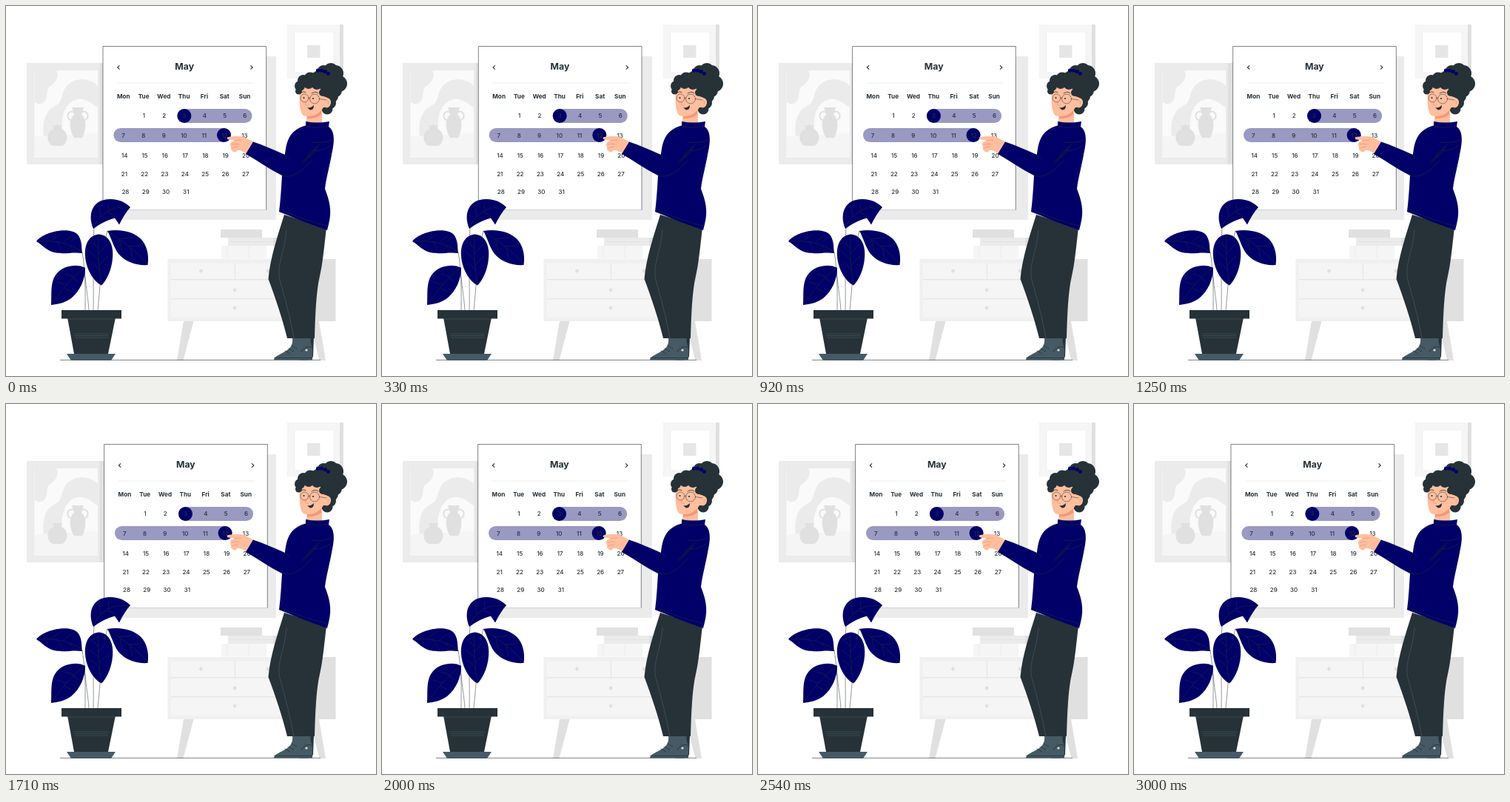
Write an HTML page that moves like this. It is 500x500 px and loops after 3.04 s.

```html
<!DOCTYPE html>
<html lang="en">
<head>
<meta charset="utf-8">
<title>Calendar</title>
<style>
  html, body { margin: 0; width: 100%; height: 100%; overflow: hidden; background: #fff; }
  svg { display: block; width: 100vw; height: 100vh; }
  text { font-family: Inter, "Open Sans", sans-serif; font-size: 8px; font-weight: 500; fill: #263238; text-anchor: middle; }
  .head { font-size: 8.2px; font-weight: 700; }
  .title { font-size: 12.3px; font-weight: 700; }
  .navy { fill: #000068; }
  .dark { fill: #263238; }
  .slate { fill: #455a64; }
  .skin { fill: #ffbe9d; }
  .line { fill: none; stroke: #263238; stroke-width: .8; stroke-linecap: round; stroke-linejoin: round; }
  .thin { stroke-width: .5; }
  .blush { fill: none; stroke: #e58a6b; stroke-width: .6; }
  .g1 { fill: #fafafa; }
  .g2 { fill: #f5f5f5; }
  .g3 { fill: #ebebeb; }
  .g4 { fill: #e0e0e0; }

  /* 3 s shake, then a 40 ms rest before the loop restarts */
  #calendar { animation: shake 3040ms linear infinite; }
  @keyframes shake {
    0%, 98.684%, 100% { transform: translateX(0); }
    9.868%, 88.816% { transform: translateX(-1px); }
    19.737%, 78.947% { transform: translateX(2px); }
    29.605%, 49.342%, 69.079% { transform: translateX(-4px); }
    39.474%, 59.211% { transform: translateX(4px); }
  }
</style>
</head>
<body>
<svg viewBox="0 0 500 500">
  <!-- Large picture -->
  <g>
    <path class="g4" d="M28.5 77H136V214H28.5Z"/>
    <path class="g3" d="M28.5 77H126.5V214H28.5Z"/>
    <path class="g1" d="M38.5 87H124V205H38.5Z"/>
    <path class="g3" d="M39 87H68C73 96 66 104 59 109C53 113 58 125 51 130C46 134 41 132 39 129Z"/>
    <path class="g3" d="M51 176C49 155 53 141 68 134C78 129 74 113 85 105C97 96 113 97 124 108V176Z"/>
    <path class="g1" d="M76 175C73 151 79 133 93 127C106 122 116 132 124 137V175Z"/>
    <path class="g2" d="M38.5 176L124 172V205H38.5Z"/>
    <path class="g4" d="M63 161H76L74.5 166C85 170 85 184 76 189H63C54 184 54 170 64.5 166Z"/>
    <path class="g4" d="M89 137H105L102 147C110 153 108 169 103 178H92C86 169 84 153 92 147Z"/>
    <path d="M91 143C81 141 82 152 88 155M103 143C113 141 112 152 106 155" fill="none" stroke="#e0e0e0" stroke-width="2"/>
  </g>

  <!-- Small picture -->
  <path class="g4" d="M380.5 25H456V98H380.5Z"/>
  <path d="M380.5 25H451V98H380.5Z" fill="#f6f6f6"/>
  <path d="M390 35H443V90H390Z" fill="#fff" stroke="#ebebeb" stroke-width=".6"/>
  <path d="M407 53H424.5V70H407Z" fill="#e6e6e6"/>

  <!-- Cabinet and books -->
  <path class="g4" d="M240 426H253.5L239.5 479H231ZM410 426H423L432 479H423.5Z"/>
  <path class="g4" d="M399 342H445.5V426H399Z"/>
  <path d="M218.5 342H400V426H218.5Z" fill="#f0f0f0"/>
  <path class="g2" d="M223 347.5H309V369H223ZM310 347.5H395V369H310ZM223 370.5H395V395H223ZM223 396.5H395V421H223Z"/>
  <path d="M223 369.7H395M223 395.7H395M309.5 347V369" fill="none" stroke="#e0e0e0" stroke-width=".7"/>
  <g class="g4">
    <circle cx="263.5" cy="358" r="2.4"/><circle cx="354" cy="358" r="2.4"/>
    <circle cx="309" cy="384" r="2.4"/><circle cx="309" cy="408" r="2.4"/>
  </g>
  <path class="g4" d="M290 302H346V313H290Z"/>
  <path class="g3" d="M300 313H367V324H300Z"/>
  <path class="g4" d="M361 313H367V324H361Z"/>
  <path d="M303 318.5H361" stroke="#e0e0e0" stroke-width=".8"/>
  <path class="g2" d="M291 324H352V341.5H291Z"/>
  <path d="M299 324V341M328 324V341" stroke="#ebebeb"/>

  <!-- Wall shadow -->
  <path class="g3" d="M144 68H365V289H144Z"/>

  <g id="calendar">
    <path d="M131 54.5H351.7V275.5H131Z" fill="#fff"/>
    <path d="M131 275.5H351.7" stroke="#b8bcbe" stroke-width=".6"/>
    <path d="M131 275.5V54.5H351.7V275.5" fill="none" stroke="#263238" stroke-width=".6"/>
    <path d="M150.5 104H334.5" stroke="#e4e4e4" stroke-width=".7"/>
    <path d="M153.5 80.3L150.7 83L153.5 85.7M330.5 80.3L333.3 83L330.5 85.7" fill="none" stroke="#263238" stroke-width="1.1"/>
    <text class="title" x="241.2" y="86.3">May</text>
    <rect x="231.5" y="139" width="101" height="19" rx="9.5" fill="#9999c2"/>
    <rect x="145.4" y="165" width="158.5" height="19" rx="9.5" fill="#9999c2"/>
    <circle class="navy" cx="240.9" cy="148.5" r="9.5"/>
    <circle class="navy" cx="294.5" cy="174.5" r="9.5"/>
    <g id="days"></g>
  </g>

  <path d="M73 478.4H425" stroke="#263238" stroke-width=".6"/>

  <!-- Plant -->
  <g>
    <path class="line thin" d="M106 353C107 375 111 394 112 411M103 333C108 362 107 385 107 411M119 300C116 340 119 375 118 411M137 304C130 330 129 360 124 411"/>
    <g class="navy">
      <path d="M118 301C110 282 116 261 141 261C154 261 162 266 168 272Q160 281 153 295.5L147 286.5Q131 291 118 301Z"/>
      <path d="M41 318C51 304 92 296 99 312C103 320 102 328 103 334C89 332 79 336 65 333C54 330 48 322 41 318Z"/>
      <path d="M137 304C155 301 175 305 185 318C192 328 193 340 191.5 350C177 351 163 346 155 338C146 330 143 314 137 304Z"/>
      <path d="M125 308.5C140 309 146 325 144 341C143 356 136 371 129 377.5C118 372 108 355 107 338C106 322 112 310 125 308.5Z"/>
      <path d="M107 354C107 370 100 385 88 395C80 401 70 403 61 404C62 390 59 372 69 361C78 350 98 348 107 354Z"/>
    </g>
    <path class="line thin" d="M118 299C128 279 145 270 165 272M128 284L126 272M139 277L138 267M137 279L147 283
      M45 318C66 316 89 321 102 332M62 317L72 309M78 319L88 311M69 318L75 328M86 323L91 329
      M138 305C157 318 177 331 191 349M152 315L170 313M166 325L182 324M154 317L157 331M168 327L171 340
      M125 310C124 336 126 359 129 376M125 327L115 319M125 342L113 332M127 357L115 346M125 335L136 322M126 350L139 337
      M106 354C88 368 74 385 62 403M92 366L80 362M82 377L69 373M91 368L98 373M79 381L88 386"/>
    <path class="slate" d="M82 470H148L142 479H88Z"/>
    <path class="dark" d="M83 421H148L138 470H92Z"/>
    <path class="dark" d="M75 411H156V422.5H75Z"/>
    <path d="M92 443H139M92.5 445.5H138.5M93 448H138M83 423H147.5" stroke="#455a64" stroke-width=".6"/>
  </g>

  <!-- Woman -->
  <g>
    <path class="dark" d="M398 447H416L415 474L408 478.5H396Z"/>
    <path class="slate" d="M387 448H412C410 455 415 461 414 467V478.5H362C362 474 368 472 377 467C385 462 388 458 387 448Z"/>
    <path class="line" d="M363 475.5H414M386 459L393 463M382 463L389 467M377 466L384 470M399 467Q405 458 413 461"/>
    <circle cx="406" cy="465" r="1.6" fill="#e0e0e0"/>
    <path class="dark" d="M376 282L433 300C430 325 428 348 424 365C419 386 418 418 417 449H380C374 424 364 394 354.5 369C357 340 367 311 376 282Z"/>
    <path d="M379 303C377 330 365 352 370 370C377 395 385 425 389 449" fill="none" stroke="#455a64" stroke-width=".7"/>

    <!-- Hair behind the head -->
    <g class="dark">
      <circle cx="429" cy="88" r="8"/><circle cx="439" cy="87" r="10"/><circle cx="445" cy="91" r="11"/>
      <circle cx="450" cy="105" r="11"/><circle cx="444" cy="114" r="10"/><circle cx="440" cy="122" r="9"/>
      <circle cx="438" cy="131" r="8"/><circle cx="434" cy="139" r="7.5"/><circle cx="429" cy="127" r="11"/>
    </g>
    <path class="skin" d="M407 139H427L427 158Q417 162 406 157Z"/>
    <path d="M407 149Q418 149 426 141L426 147Q418 153 407 152Z" fill="#f0997a"/>
    <path class="skin" d="M397 111C396 124 396 143 402 148C411 152 424 146 429 137L434 137C440 136 440 125 434 124L431 108C420 99 405 101 397 111Z"/>
    <g class="dark">
      <circle cx="397" cy="108" r="7"/><circle cx="402" cy="101" r="8"/><circle cx="411" cy="98" r="8.5"/>
      <circle cx="422" cy="97" r="9.5"/><circle cx="431" cy="103" r="11"/><circle cx="434" cy="115" r="8.5"/>
      <circle cx="395.500" cy="115" r="4.500"/><circle cx="409" cy="105" r="7"/><circle cx="420" cy="106" r="7"/>
      <circle cx="428" cy="117" r="5"/>
    </g>
    <path class="skin" d="M431 128C433 122 440 125 439 131C438 137 433 139 430 136Z"/>
    <g class="navy">
      <circle cx="421.5" cy="87" r="2.6"/><circle cx="426.500" cy="87" r="2.600"/>
      <circle cx="431.500" cy="88.500" r="2.600"/><circle cx="435.500" cy="91.500" r="2.400"/>
    </g>
    <g class="line thin">
      <circle cx="403.5" cy="124.5" r="5.5"/><circle cx="417" cy="125.5" r="6.5"/>
      <path d="M409 124.500Q410 123 411 124.500M423.500 125.500L433 127"/>
    </g>
    <g class="dark"><circle cx="402.5" cy="124" r="1.1"/><circle cx="415" cy="125" r="1.1"/></g>
    <path class="line" d="M399 117Q402 114.500 405 116.500M413 118Q418 114.500 422 118"/>
    <path class="dark" d="M407 137.500Q412 138 416 134Q416 141 411 140.500Z"/>
    <path class="blush" d="M408 126L404 133Q406 135 409 134M434 129Q437 128 435 133"/>

    <!-- Hand -->
    <path class="skin" d="M299 177.500C306 175.500 315 175.500 322 177L335 184L326 200C320 196 314 193 312 196Q309 199 306 196Q303 194 304 191Q302 187 304 184L309 181.500L301 180.500Q298 180 299 177.500Z"/>
    <path class="blush" d="M309 181.500L318 181M305 187Q310 185 315 187M306 192Q310 189 314 191"/>

    <path class="navy" d="M334 183.5C348 188 363 195 377 201C379 184 382 168 405 161.5L405 156Q420 159 437 156L436 163C446 170 443 188 440 201C437 218 433 231 431 247C437 263 441 276 436 295L434 303Q402 292 369 278C371 262 372 246 373 229C355 220 340 209 324 200Z"/>
    <path d="M425 186Q410 195 398 214Q415 204 425 186Z" fill="#0b0f50"/>
    <path class="line thin" d="M441 181Q428 186 413 184M439 189Q427 196 418 196M373 229C387 234 402 222 413 209M406 163Q421 166 436 162M377 201L383 206M374 276Q401 289 434 297"/>
  </g>
</svg>
<script>
  const days = document.getElementById("days");
  const pitch = 27.3;

  function row(labels, x, y, cls) {
    labels.forEach((label, i) => {
      const t = document.createElementNS(days.namespaceURI, "text");
      t.setAttribute("x", x + i * pitch);
      t.setAttribute("y", y);
      if (cls) t.setAttribute("class", cls);
      t.textContent = label;
      days.append(t);
    });
  }

  const range = (from, to) => Array.from({ length: to - from + 1 }, (_, i) => from + i);

  row(["Mon", "Tue", "Wed", "Thu", "Fri", "Sat", "Sun"], 158.8, 124.6, "head");
  row(range(1, 6), 186.4, 151.2);
  row(range(7, 13), 158.6, 178);
  row(range(14, 20), 160.2, 205);
  row(range(21, 27), 160, 230);
  row(range(28, 31), 161.4, 254);
</script>
</body>
</html>
```
